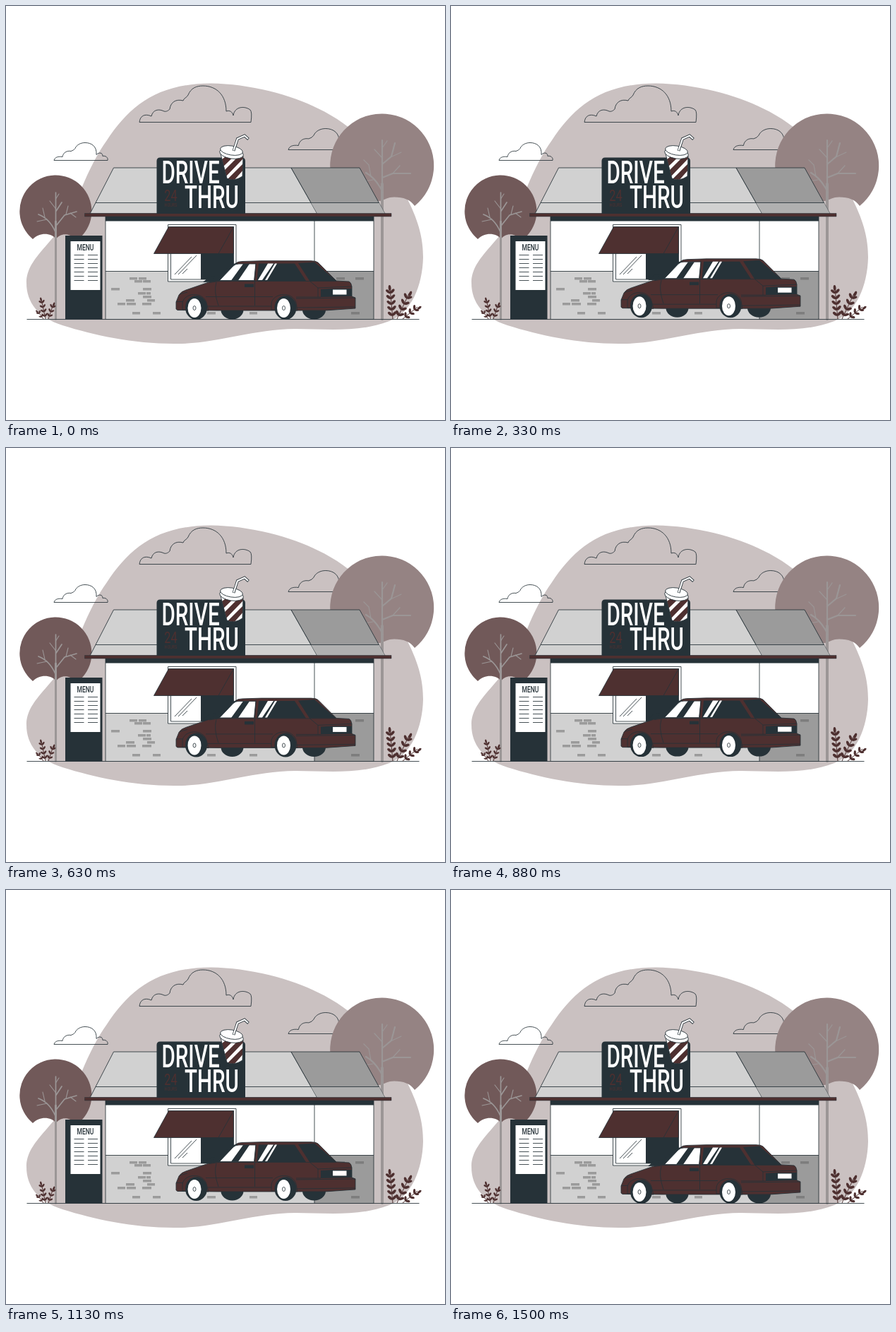
An HTML page for the animation above (1.54 s loop, 622 px wide and 586 px high).

```html
<!DOCTYPE html>
<html lang="en">
<head>
<meta charset="utf-8">
<title>Drive thru</title>
<style>
  html, body { margin: 0; width: 100%; height: 100%; overflow: hidden; background: #fff; }
  svg { display: block; width: 622px; height: 586px; }
  .ink { fill: #263238; }
  .red { fill: #4e3030; }
  .light { fill: #d1d1d1; }
  .shade { fill: #9b9b9b; }
  .white { fill: #fff; }
  .line { fill: none; }
  .edge, .line { stroke: #263238; stroke-width: .85; stroke-linejoin: round; }
  .twig { fill: none; stroke: #9b9696; stroke-linecap: round; stroke-linejoin: round; }
  text { font-family: Roboto, "Liberation Sans", sans-serif; }
</style>
</head>
<body>
<svg viewBox="0 0 622 586">
  <defs>
    <path id="cloud" class="line" vector-effect="non-scaling-stroke" d="M0 0C1-4 5-6 12-5C13-11 18-14 24-13Q28-14 30-17C32-22 38-25 44-25C53-25 61-20 60-8C64-12 69-11 69-6C73-7 77-4 76 0Z"/>
    <g id="wheel">
      <ellipse class="ink" cx="1.500" rx="15.500" ry="17"/>
      <ellipse class="white" cx="-1" cy=".5" rx="9.500" ry="13.500"/>
      <ellipse class="white edge" cx="-1" cy=".5" rx="2" ry="3"/>
    </g>
    <clipPath id="cupClip"><path d="M304 209L313 244Q323 249 335 241L336 212Z"/></clipPath>
  </defs>

  <path fill="#cac1c1" d="M29 392C29 354 72 336 98 280C112 245 125 215 143 190C175 142 213 110 290 109.500C345 110 405 126 442 145C500 172 548 228 573 282C587 312 591 334 591 356C590 396 574 435 543 446C500 463 450 457 410 457C345 458 296 479 238 478C180 478 125 466 80 452C46 441 29 420 29 392Z"/>

  <path class="line" d="M189 164.500C190 155 197 152 206 156C208 147 216 145 224 149C227 150 230 148 232 146C233 137 240 131 251 134C252 130 256 130 258 126C262 116 270 113 279 113C298 113 312 126 312 149C317 147 321 150 322 155C324 142 338 141 346 147Q349 150 347 164.500Z"/>
  <use href="#cloud" transform="translate(68 218.500)"/>
  <use href="#cloud" transform="translate(400 203.500) scale(1.2)"/>

  <!-- trees -->
  <path fill="#958383" d="M478 275A73.500 73.500 0 1 1 579 283C573 274 563 270.500 550 270.500C541 270.500 537 274 530 276Z"/>
  <path class="twig" stroke-width="4" d="M533 443V252"/>
  <path class="twig" stroke-width="2.200" d="M533 255V190M533 262Q524 244 510 236M533 243L548 237L573 237M533 224L546 213L551 194"/>
  <path class="twig" stroke-width="1.200" d="M520 246L508 248M517 241L514 225M533 215L522 203M548 237L558 226M545 214L560 207M533 201L540 191M514 225L507 218"/>
  <path fill="#715959" d="M38 330A51 51 0 1 1 105 328L96 328C88 321 76 322 71 330C64 321 48 320 38 330Z"/>
  <path class="twig" stroke-width="3" d="M70.500 443V305"/>
  <path class="twig" stroke-width="1.700" d="M70.500 310V264M70 320Q62 301 46 295M71 311L83 296L100 291M70.500 291L79 278"/>
  <path class="twig" stroke-width="1.100" d="M58 302L44 305M55 299L52 286M70.500 287L62 276M85 295L88 283M91 293L99 299M70.500 273L75 266"/>

  <path class="line" d="M29.500 443.500H585.500"/>
  <g id="plants" class="red"></g>

  <!-- menu board -->
  <path class="ink" d="M84 325H136.500V443.500H84Z"/>
  <path class="white" d="M91.500 333H133.500V402H91.500Z"/>
  <text class="ink" transform="translate(112.500 345.500) scale(.68 1)" font-size="12.500" font-weight="500" text-anchor="middle">MENU</text>
  <path id="menuLines" class="line"/>

  <!-- walls -->
  <path class="white" d="M141 298H521V376H141Z"/>
  <path class="light" d="M141 375H437V443.500H141Z"/>
  <path class="shade" d="M437 375H521V443.500H437Z"/>
  <g id="bricks"></g>
  <path class="line" d="M141 298V443.500H521V298M437 304V443.500M141 375.500H521"/>
  <path class="ink" d="M141 297H521V304.500H141Z"/>

  <!-- roof -->
  <path class="light edge" d="M152.500 229H404L441 294H119Z"/>
  <path class="shade edge" d="M404 229H501L537 294H441Z"/>
  <path fill="#b0b0b0" d="M432 278.500H528.500L537 294H441Z"/>
  <path class="line" d="M127 278.500H528.500"/>
  <path class="red" stroke="#263238" stroke-width=".5" d="M111.500 293.500H546V298H111.500Z"/>

  <!-- serving window -->
  <path class="white edge" d="M229.500 309.500H326V390H229.500Z"/>
  <path class="white edge" d="M233.500 313H322.500V387H233.500Z"/>
  <path class="ink" d="M276 345H322.500V387H276Z"/>
  <path class="line" d="M239 380L263 355M244 380L270 353M250 379L257 372"/>
  <path class="red edge" d="M230.500 312.500H322.500V350.500H209.500ZM322.500 312.500L301 350.500"/>

  <!-- sign -->
  <path class="ink" d="M213.500 294V219.500Q213.500 214.500 218.500 214.500H334Q339 214.500 339 219.500V294Z"/>
  <g class="white" font-size="43.600" font-weight="500">
    <text transform="translate(220.500 250.500) scale(.68 1)">DRIVE</text>
    <text transform="translate(253 286) scale(.68 1)">THRU</text>
  </g>
  <g class="red" text-anchor="middle">
    <text transform="translate(233.500 275.500) scale(.76 1)" font-size="21.500">24</text>
    <text transform="translate(233.500 283.500) scale(.76 1)" font-size="7">HOURS</text>
  </g>

  <!-- cup -->
  <g id="cup">
    <path class="white" d="M304 209L313 244Q323 249 335 241L336 212Z"/>
    <path class="red" clip-path="url(#cupClip)" d="M302 220L318 208H328L306 229ZM307 235L333 209L338 214L310 243ZM312 247L337 222V231L322 248ZM328 249L338 238V249Z"/>
    <path class="line" d="M304 209L313 244Q323 249 335 241L336 212Z"/>
    <ellipse class="white edge" cx="319.500" cy="208.500" rx="17" ry="7.500" transform="rotate(9 319.500 208.500)"/>
    <ellipse class="white edge" cx="319.500" cy="204.500" rx="16" ry="6.500" transform="rotate(9 319.500 204.500)"/>
    <path d="M322.500 205L328 188L338 183.500L343.500 188.500" fill="none" stroke="#263238" stroke-width="3.800"/>
    <path d="M322.500 204.500L328 188L338 183.500L343 188" fill="none" stroke="#fff" stroke-width="2.200"/>
  </g>

  <g id="car">
    <ellipse class="ink" cx="320.500" cy="430" rx="16" ry="13.500"/>
    <ellipse class="ink" cx="436.500" cy="430" rx="16.500" ry="13.500"/>
    <path class="ink" d="M279 391L287 384L296 382L304 390Z"/>
    <path class="red edge" d="M241 429V419L245 409Q248 404 255 402L287 391L302 388L325 364.500Q328 361.500 335 361.500L362 360.700H432Q439 360.700 442 363L468 389L486 390Q489 391 490 397V411L495 413V428L452 431H300L243 430.500Z"/>
    <path class="ink" d="M288 390.500L317 368Q322 364 328 364L304 389Z"/>
    <path class="white edge" d="M302.500 388.500L322 368Q325 365 330 365H354L351.500 388.500Z"/>
    <path class="ink" d="M319 388.500L336 365H345L329 388.500Z"/>
    <path class="ink" d="M355.500 389L358 364.500H409L425 389Z"/>
    <path class="white" d="M357 388L371 364.500H379L363 388ZM367 388L381 364.500H384L370 388Z"/>
    <path class="ink" d="M414 364L437 362.500L468 389H430Z"/>
    <path class="ink" d="M446 401L463 400H490V411L446 412Z"/>
    <path class="white" d="M463 401.500H482.500V408.500H463Z"/>
    <path class="ink" d="M338 393.500H351V398H338Z"/>
    <path class="line" d="M288 391.500L302 389.500H468M354 364L352.500 389V424M298 391Q294 404 301 424M283 411.500H378M411 412H446M411 414L495 413M285 425H380M411 427L495 426M241 418.500H254M246 408L257 405M430 389L442 399V412M442 399L490 397"/>
    <path class="red edge" d="M250 430V421C251 406 279 403 284 420L287 431ZM376 430V421C378 406 406 403 411 420L413 431Z"/>
    <use href="#wheel" x="268" y="427"/>
    <use href="#wheel" x="394.500" y="427"/>
  </g>
</svg>
<script>
  const byId = id => document.getElementById(id);

  // x, y, width
  const bricks = [
    [175, 384, 11], [188, 384, 11], [182, 388, 11], [194, 388, 11], [149, 399, 12],
    [194, 399, 12], [187, 405, 11], [199, 405, 6], [194, 410, 12], [170, 415, 12],
    [200, 415, 11], [158, 420, 11], [171, 420, 13], [193, 420, 13], [179, 433, 11],
    [208, 433, 11], [285, 433, 12], [345, 433, 11], [468, 384, 12], [495, 384, 12],
    [489, 433, 12]
  ];
  byId("bricks").innerHTML = bricks.map(([x, y, w]) =>
    `<rect x="${x}" y="${y}" width="${w}" height="3.5" fill="${x > 437 ? "#7d7d7d" : "#9b9b9b"}"/>`).join("");

  let rows = "";
  for (let i = 0; i < 7; i++) {
    const y = 352.5 + i * 6;
    rows += `M96.5 ${y}H110.500M116 ${y}H130`;
  }
  byId("menuLines").setAttribute("d", rows);

  // A stem from (x, 443) to (tipX, tipY) with paired leaves
  function sprout(x, tipX, tipY, pairs, size) {
    const heading = Math.atan2(tipY - 443, tipX - x) * 180 / Math.PI;
    const leaf = (px, py, turn) =>
      `<ellipse cx="${size}" rx="${size}" ry="${size * 0.48}" transform="translate(${px} ${py}) rotate(${heading + turn})"/>`;
    let parts = `<path d="M${x} 443L${tipX} ${tipY}" stroke="#4e3030"/>` + leaf(tipX, tipY + size, 0);
    for (let i = 0; i < pairs; i++) {
      const k = (i + 0.6) / pairs * 0.9;
      const px = x + (tipX - x) * k, py = 443 + (tipY - 443) * k;
      parts += leaf(px, py, -48) + leaf(px, py, 48);
    }
    return parts;
  }
  byId("plants").innerHTML =
    sprout(548, 544, 399, 5, 4) + sprout(554, 571, 407, 4, 4) + sprout(562, 583, 426, 3, 3.4) +
    sprout(56, 50, 415, 4, 2.7) + sprout(60, 67, 422, 3, 2.7) + sprout(53, 45, 432, 2, 2.2);

  const LOOP = 1540, STEP = 1000 / 24, STEPS = 37, LIFT = 7.2;
  const car = byId("car");
  function draw() {
    const time = performance.now() % LOOP;
    const step = Math.floor((time + 4) / STEP) % STEPS;
    const lift = LIFT * Math.sin(Math.PI * step / STEPS) ** 2;
    car.setAttribute("transform", `translate(0 ${-lift})`);
    requestAnimationFrame(draw);
  }
  draw();
</script>
</body>
</html>
```
